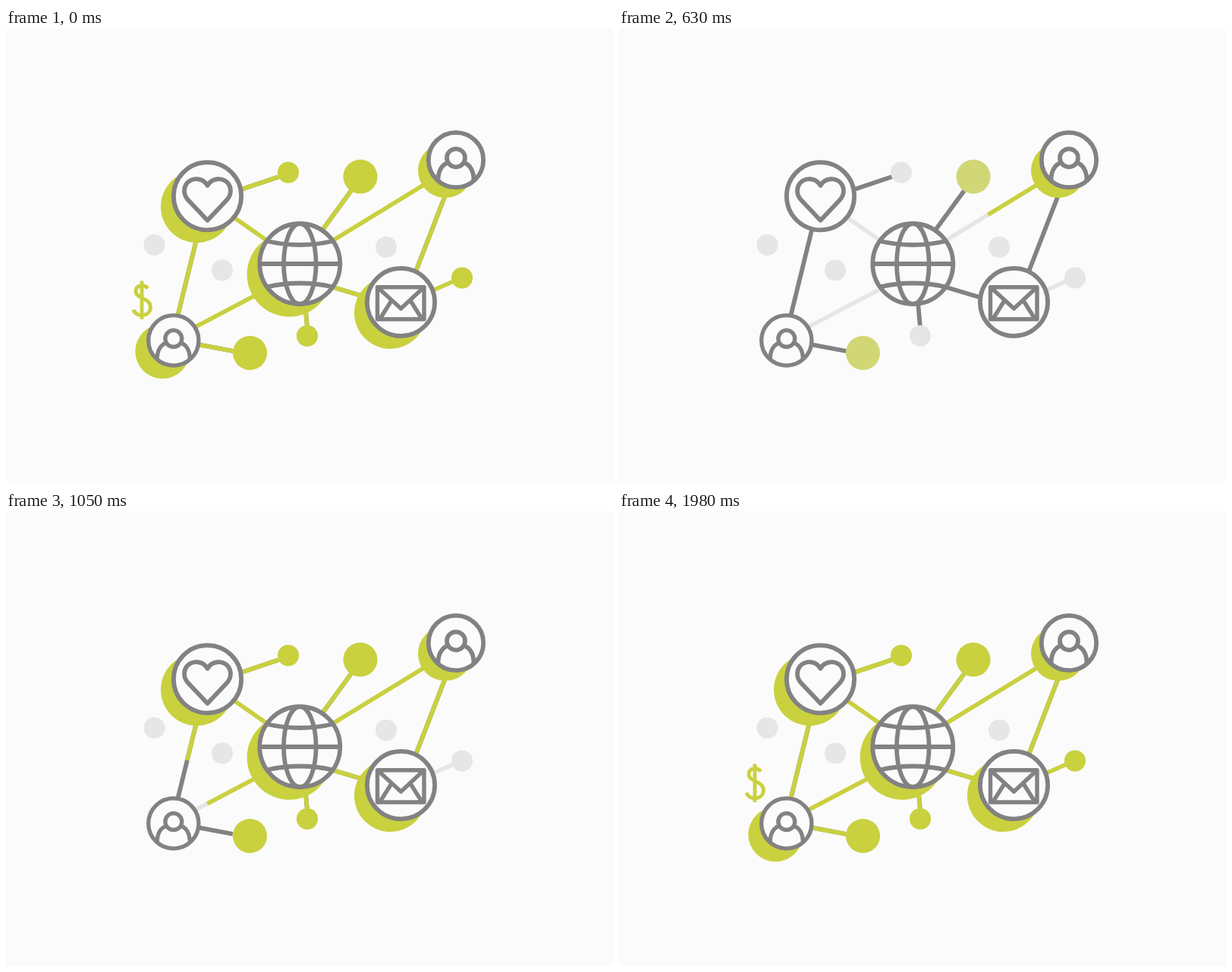
Write an HTML page without scripts that moves like this. It is 800 px wide and 600 px high and loops after 2010 ms.

```html
<!DOCTYPE html>
<html lang="en">
<head>
<meta charset="utf-8">
<title>Network</title>
<style>
  @property --t { syntax: "<number>"; inherits: true; initial-value: 2010; }

  /* One clock in ms: the network builds from 300 to 2010, then fades until 2310. */
  @keyframes clock { from { --t: 300; } to { --t: 2310; } }

  html, body { margin: 0; width: 100%; height: 100%; overflow: hidden; background: #fbfbfb; }
  svg {
    display: block; width: 800px; height: 600px; fill: none;
    --green: #c9d13e; --dark: #828282; --light: #e6e6e6;
    animation: clock 2010ms steps(67) -1710ms infinite;
  }
  .all { opacity: clamp(0, (2310 - var(--t)) / 300, 1); }

  /* --a: start, --d: duration */
  .grow use {
    stroke: var(--green); stroke-width: 5.6; stroke-dasharray: 1px 3px;
    stroke-dashoffset: calc(1.01px * (1 - clamp(0, (var(--t) - var(--a)) / var(--d), 1)));
  }
  .lit > * { opacity: clamp(0, (var(--t) - var(--a)) / var(--d), 1); }

  /* --a: swell, --b: settle and cast the shadow */
  .shadow { fill: var(--green); opacity: clamp(0, (var(--t) - var(--b)) / 120, 1); }
  .node {
    stroke: var(--dark); stroke-width: 5.8; stroke-linejoin: round;
    transform: scale(calc(1 + .08 * (clamp(0, (var(--t) - var(--a)) / 60, 1) - clamp(0, (var(--t) - var(--b)) / 120, 1))));
  }
  .ring { fill: #fbfbfb; }
</style>
</head>
<body>
<svg viewBox="0 0 800 600">
  <defs>
    <path id="user-globe" pathLength="1" d="M593 181L405 296"/>
    <path id="user-mail" pathLength="1" d="M590 192L530 347"/>
    <path id="top-globe" pathLength="1" d="M467 198L410 276"/>
    <path id="globe-heart" pathLength="1" d="M370 298.5L275 232"/>
    <path id="globe-mail" pathLength="1" d="M395 331L515 367"/>
    <path id="globe-friend" pathLength="1" d="M342 345.6L250 394"/>
    <path id="globe-dot" pathLength="1" d="M392 340L398 406"/>
    <path id="heart-dot" pathLength="1" d="M280 223L372 192"/>
    <path id="heart-friend" pathLength="1" d="M262 234L224 389"/>
    <path id="low-friend" pathLength="1" d="M315 429L235 414"/>
    <path id="mail-dot" pathLength="1" d="M550 351.5L601 329"/>

    <circle id="small" r="14"/>
    <circle id="big" r="22.5"/>
    <g id="person">
      <circle class="ring" r="36.2"/>
      <path d="M-23.5 26C-23.5 14 -18 6 -10.5 3.5M23.5 26C23.5 14 18 6 10.5 3.5"/>
      <circle cy="-2.7" r="12"/>
    </g>
  </defs>

  <g class="all">
    <g stroke="var(--light)" stroke-width="5.6">
      <use href="#user-globe"/>
      <use href="#globe-heart"/>
      <use href="#globe-friend"/>
      <use href="#mail-dot"/>
    </g>
    <g stroke="var(--dark)" stroke-width="5.8">
      <use href="#user-mail"/>
      <use href="#top-globe"/>
      <use href="#globe-mail"/>
      <use href="#globe-dot"/>
      <use href="#heart-dot"/>
      <use href="#heart-friend"/>
      <use href="#low-friend"/>
    </g>

    <g class="grow">
      <use href="#user-globe" style="--a:510;--d:210"/>
      <use href="#user-mail" style="--a:570;--d:308"/>
      <use href="#top-globe" style="--a:600;--d:150"/>
      <use href="#globe-heart" style="--a:720;--d:190"/>
      <use href="#globe-mail" style="--a:720;--d:210"/>
      <use href="#globe-friend" style="--a:753;--d:355"/>
      <use href="#globe-dot" style="--a:720;--d:140"/>
      <use href="#heart-dot" style="--a:930;--d:100"/>
      <use href="#heart-friend" style="--a:930;--d:195"/>
      <use href="#low-friend" style="--a:1020;--d:140"/>
      <use href="#mail-dot" style="--a:1080;--d:120"/>
    </g>

    <g fill="var(--light)">
      <use href="#small" x="195.5" y="286"/>
      <use href="#small" x="285" y="319.5"/>
      <use href="#small" x="501" y="289"/>
      <use href="#small" x="372" y="190.5"/>
      <use href="#small" x="397" y="406"/>
      <use href="#small" x="601" y="329.5"/>
      <use href="#big" x="467" y="196"/>
      <use href="#big" x="321.5" y="428.5"/>
    </g>
    <g class="lit" fill="var(--green)">
      <use href="#big" x="467" y="196" style="--a:570;--d:90"/>
      <use href="#big" x="321.5" y="428.5" style="--a:570;--d:90"/>
      <use href="#small" x="397" y="406" style="--a:850;--d:60"/>
      <use href="#small" x="372" y="190.5" style="--a:990;--d:60"/>
      <use href="#small" x="601" y="329.5" style="--a:1170;--d:90"/>
      <path d="M179 333.5V384M187 343.5C182 337 171 339 171 347.5C171 357 190.5 356 190.5 368C190.5 381.500 171 382 168 371.500"
        fill="none" stroke="var(--green)" stroke-width="4.8" style="--a:1200;--d:150"/>
    </g>

    <g transform="translate(593 174)" style="--a:330;--b:480">
      <circle class="shadow" cx="-14" cy="14" r="36"/>
      <g class="node"><use href="#person"/></g>
    </g>

    <g transform="translate(387.3 311)" style="--a:690;--b:750">
      <circle class="shadow" cx="-14" cy="14" r="55.7"/>
      <g class="node">
        <circle class="ring" r="53"/>
        <ellipse rx="21.3" ry="53"/>
        <path d="M-53 0H53M-43.500 -30Q0 -20 43.500 -30M-43.500 30.500Q0 20.500 43.500 30.500"/>
      </g>
    </g>

    <g transform="translate(520.5 361.5)" style="--a:775;--b:930">
      <circle class="shadow" cx="-14" cy="14" r="47.5"/>
      <g class="node">
        <circle class="ring" r="44.6"/>
        <path d="M-31 -19.700H30.500V22.500H-31ZM-29 -18L0 8.500L28.500 -18M-12.500 -2L-27 21M12.500 -2L27 21" stroke-width="5.4"/>
      </g>
    </g>

    <g transform="translate(265.5 221.7)" style="--a:840;--b:925">
      <circle class="shadow" cx="-14" cy="14" r="47.5"/>
      <g class="node">
        <circle class="ring" r="44.6"/>
        <path d="M0 -14C-6 -24.500 -20 -25 -27 -17C-32 -11 -31.500 -1.500 -26 4.500L0 32L26 4.500C31.500 -1.500 32 -11 27 -17C20 -25 6 -24.500 0 -14Z"/>
      </g>
    </g>

    <g transform="translate(220.8 412)" style="--a:1080;--b:1140">
      <circle class="shadow" cx="-14.500" cy="14.500" r="36"/>
      <g class="node"><use href="#person" transform="scale(.915)"/></g>
    </g>
  </g>
</svg>
</body>
</html>
```
